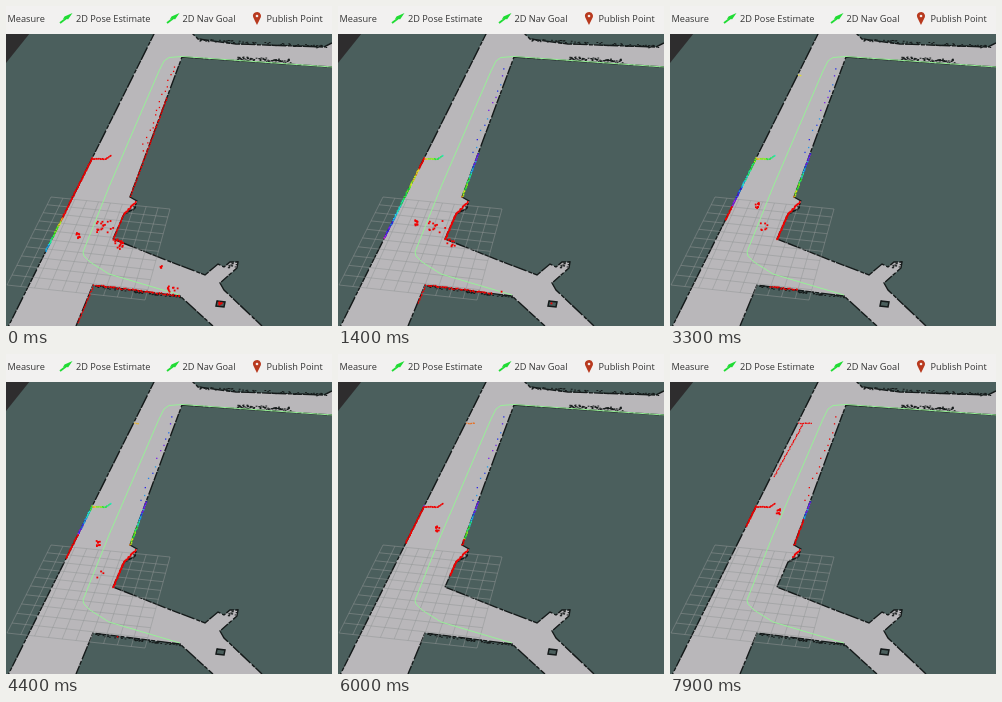
Animation of 326 by 320 pixels, one loop 8000 ms. Source, as an HTML page with a canvas:

```html
<!DOCTYPE html>
<html lang="en">
<head>
<meta charset="utf-8">
<title>Laser scan on a map</title>
<style>
html, body { margin: 0; width: 326px; height: 320px; overflow: hidden; }
canvas { display: block; }
</style>
</head>
<body>
<canvas id="stage" width="326" height="320"></canvas>
<script>
const W = 326, H = 320, LOOP = 8000, STEP = 100;
const INK = '#151a1a', FLOOR = '#b9b7ba', UNKNOWN = '#4b5f5d';
const view = document.getElementById('stage').getContext('2d');
const base = document.createElement('canvas');
base.width = W;
base.height = H;
const g = base.getContext('2d');

const hash = (a, b = 0, c = 0) => {
  const s = Math.sin(a * 127.1 + b * 311.7 + c * 74.7 + 1.3) * 43758.5453;
  return s - Math.floor(s);
};
const lerp = (a, b, k) => a + (b - a) * k;

function trace(points) {
  g.beginPath();
  for (let i = 0; i < points.length; i += 2) g.lineTo(points[i], points[i + 1]);
}
function fill(color, points) {
  trace(points);
  g.fillStyle = color;
  g.fill();
}
function stroke(color, width, points, dash = []) {
  trace(points);
  g.setLineDash(dash);
  g.strokeStyle = color;
  g.lineWidth = width;
  g.stroke();
}
const wall = points => stroke(INK, 1.4, points, [9, 1, 4, 2, 14, 1]);

// Loose black cells in a slanted strip
function speckle(x1, x2, y, slope, height, count) {
  g.fillStyle = INK;
  for (let i = 0; i < count; i++) {
    const x = lerp(x1, x2, hash(i, x1));
    g.fillRect(x, y + (x - x1) * slope + (hash(i, x1, 1) - 0.5) * height, 1.8, 1);
  }
}

// Straight walls of the corridor
const leftX = y => 148 - (y - 28) * 0.498;
const rightX = y => 176 - (y - 51) * 0.369;
const bottomY = x => 279 + (x - 87) * 0.126;

function drawMap() {
  fill(UNKNOWN, [0, 0, W, 0, W, H, 0, H]);
  fill('#2e2d2e', [0, 27, 24, 27, 0, 57]);

  const left = [leftX(27), 27, leftX(320), 320];
  const lower = [70, 320, 87, 279, 174, 290, 207, 320];
  const branch = [256, 320, 218, 284, 214, 277, 231, 262, 232, 256, 224, 256,
    218, 261, 212, 258, 199, 269, 160, 254, 107, 233];
  const right = [107, 233, 118, 208, 128, 203, 131, 195, 124, 191, 176, 51, 326, 61];
  const top = [326, 37, 318, 41, 230, 38, 192, 33, 186, 27];
  fill(FLOOR, [...left, ...lower, ...branch, ...right, ...top]);
  [left, lower, branch, right, top].forEach(wall);
  speckle(192, 320, 34, 0.05, 3, 70);
  speckle(230, 284, 52, 0.05, 4, 80);
  speckle(219, 231, 260, -0.2, 5, 12);
  speckle(118, 129, 207, -0.6, 3, 12);
  speckle(87, 174, 280, 0.126, 2, 50);

  const box = [211, 295, 219, 296, 218, 301, 210, 300, 211, 295, 219, 296];
  fill(UNKNOWN, box);
  stroke(INK, 1.5, box);

  // Ground grid, rows closer together with distance
  for (let i = 0; i <= 10; i++) {
    const k = i / 10, row = k / (1.15 - 0.15 * k), color = 'rgba(145,149,149,.5)';
    stroke(color, 1, [lerp(45, 1, row), lerp(191, 279, row), lerp(164, 139, row), lerp(203, 294, row)]);
    stroke(color, 1, [lerp(45, 164, k), lerp(191, 203, k), lerp(1, 139, k), lerp(279, 294, k)]);
  }

  stroke('#98f098', 1, [326, 61, 176, 50.5, 163, 51.5, 158, 55, 153, 65, 103, 181,
    77, 246, 78, 250, 84, 256, 103, 268, 140, 279, 174, 289]);
}

function drawToolbar() {
  fill('#f2f1f0', [0, 0, W, 0, W, 28, 0, 28]);
  g.fillStyle = '#333';
  g.font = '9.2px "Open Sans", "Noto Sans", sans-serif';
  g.fillText('Measure', 1.5, 16);
  g.fillText('2D Pose Estimate', 70, 16);
  g.fillText('2D Nav Goal', 176.5, 16);
  g.fillText('Publish Point', 260.5, 16);
  for (const x of [54, 161]) {
    stroke('#20dc34', 1.8, [x, 17, x + 8, 11]);
    fill('#20dc34', [x + 12.5, 7, x + 8, 13.5, x + 6.5, 12.5, x + 3, 13, x + 4.5, 10.5]);
  }
  g.fillStyle = '#b8391e';
  g.beginPath();
  g.arc(251, 10, 4, Math.PI * 0.9, Math.PI * 2.1);
  g.quadraticCurveTo(253.5, 14, 251, 19);
  g.quadraticCurveTo(248.5, 14, 247.2, 11.2);
  g.fill();
  g.fillStyle = '#f4e9e6';
  g.beginPath();
  g.arc(251, 10, 1.3, 0, 7);
  g.fill();
}

function dot(x, y, hue, size) {
  view.fillStyle = `hsl(${hue} ${hue ? 80 : 100}% ${hue ? 52 : 47}%)`;
  view.fillRect(x - size / 2, y - size / 2, size, size);
}

// Laser hits along a line; the hits keep their places while the visible range moves
function trail(from, to, gap, at, hue = () => 0, size = 1.6, spread = 0.8) {
  for (let i = Math.ceil(from / gap); i * gap <= to; i++) {
    const v = i * gap, [x, y] = at(v);
    dot(x + (hash(i, 1) - 0.5) * spread, y + (hash(i, 2) - 0.5) * spread, hue(v, hash(i, 3)), size);
  }
}

function group(x, y, w, h, count) {
  for (let i = 0; i < count; i++) dot(x + (hash(i, x | 0) - 0.5) * w, y + (hash(i, w, 5) - 0.5) * h, 0, 1.8);
}

// Time in seconds
function drawScan(t) {
  const early = t < 1, late = t > 7;

  // A band of colour slides up the left wall, red outside it
  const band = Math.max(140, 212 - 35 * t), bandEnd = 260 - 18 * t;
  trail(152, 245 - 9.2 * t, 1, y => [leftX(y), y], (y, r) =>
    y < band || y > bandEnd ? 0 : 35 + 255 * (y - band) / (bandEnd - band) + (r - 0.5) * 60);
  trail(87, 105, 1, x => [x, 153 - Math.max(0, x - 100) * 0.7], (x, r) =>
    early || t > 5.5 ? 0 : 30 + (x - 87) * 6 + r * 40, 1.5);

  // Right wall: dense near by, sparse farther up
  trail(Math.min(148, 92 + 80 * t), 191, early ? 2 : 1, y => [rightX(y), y], (y, r) =>
    early || y > 248 - 10.5 * t ? 0 : 60 + (191 - y) * 5 + (r - 0.5) * 80, 1.5);
  trail(60, 147, early ? 5 : 7, y => [rightX(y) - 5, y], (y, r) =>
    early || late ? 0 : 200 + r * 70, 1.3, 4);

  // Corner
  const cornerEnd = Math.min(234, 282 - 10 * t);
  trail(196, Math.min(208, cornerEnd), 0.6, y => [130 - (y - 196), y]);
  trail(208, cornerEnd, early ? 1.5 : 0.8, y => [118 - (y - 208) * 0.42, y]);

  // Lower walls slip out of view
  trail(87 + Math.max(0, t - 2) * 10, 174 - 14 * t, 1.4, x => [x, bottomY(x)], () => 0, 1.5, 1.6);
  trail(281, 317 - 14 * t, 1.5, y => [87 - (y - 281) * 0.42, y], () => 0, 1.3);

  // Far end comes into view
  if (t > 3) trail(128, 130 + (t - 3) * 2.4, 1.5, x => [x, 69.5], () => Math.max(0, 100 - 12.7 * t), 1.3);
  trail(lerp(123, 70, Math.min(1, Math.max(0, t - 6.2))), t > 6.2 ? 123 : 0, 1.2,
    y => [133 - (y - 70) * 0.547, y], () => 0, 1.2);

  // Standing groups thin out while someone walks up the corridor
  group(99, 221, 17, 12, 18 - 3.6 * t);
  group(113, 238, 9, 11, 18 - 7 * t);
  group(168, 283, 13, 6, 10 - 7 * t);
  group(156, 262, 3, 4, 4 - 5 * t);
  group(214, 297, 5, 4, 5 - 3 * t);
  group(72 + 4.6 * t, 229.5 - 9.1 * t, 3.5, 6, 10);
}

function draw(now) {
  const step = Math.floor((now % LOOP) / STEP);
  view.drawImage(base, 0, 0);
  drawScan(step * STEP / 1000);
}

drawMap();
drawToolbar();
const start = performance.now();
function tick() {
  draw(performance.now() - start);
  requestAnimationFrame(tick);
}
tick();
</script>
</body>
</html>
```
